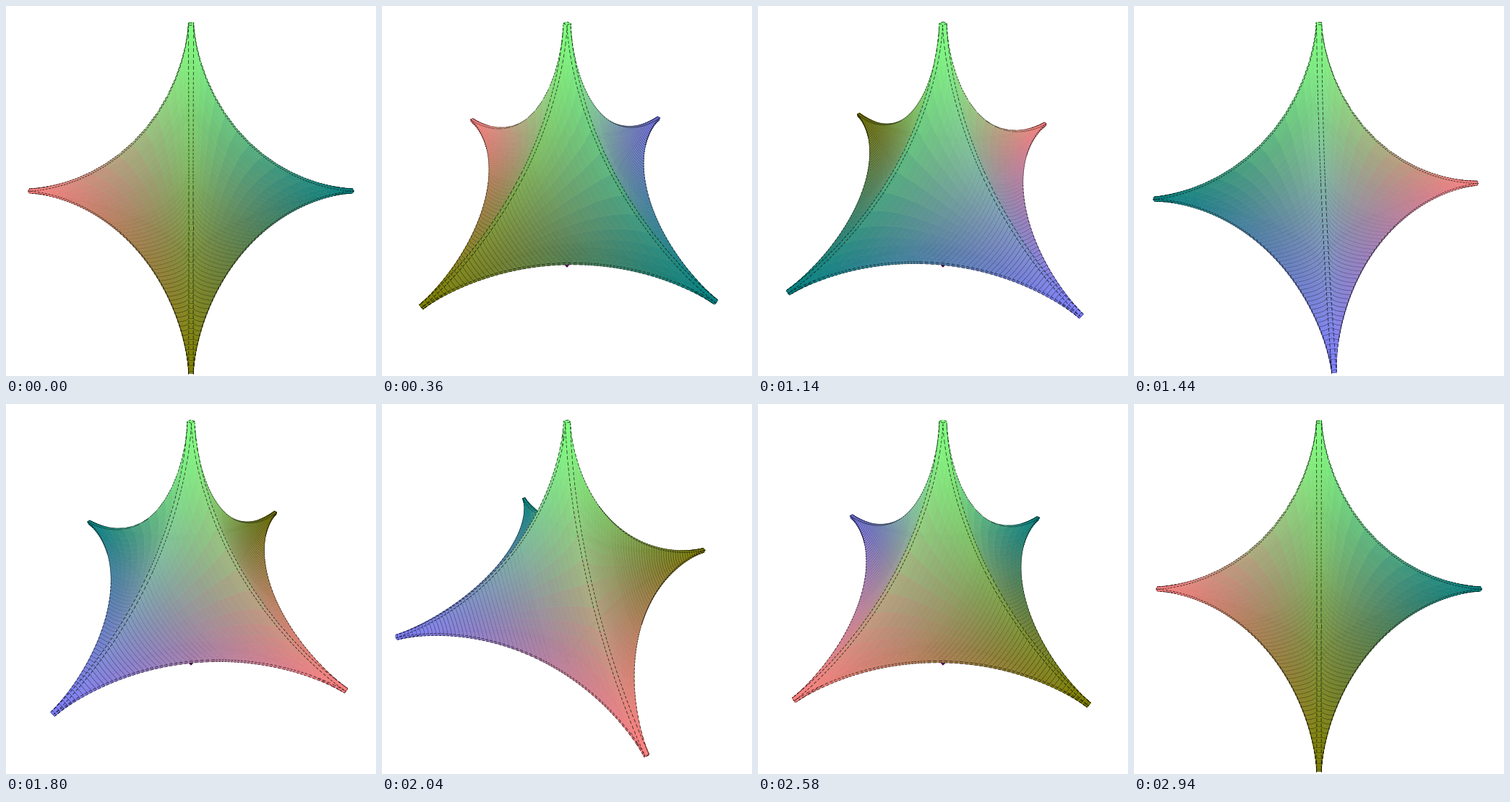
A matplotlib script that plays this animation: 512x512 px, repeating every 3000 ms.

```python
import numpy as np
import matplotlib.pyplot as plt
from matplotlib.animation import FuncAnimation
from matplotlib.collections import PolyCollection

SIZE, DPI = 512, 100
FRAMES, INTERVAL = 50, 60
PX = 72 / DPI

# Camera: distance, focal length in pixels, elevation
DIST, FOCAL, ELEV = 2.002, 448, np.radians(50.4)
SIN_E, COS_E = np.sin(ELEV), np.cos(ELEV)

# Star surface |x|^(2/n) + |y|^(2/n) + |z|^(2/n) = 1 with flat ridges of half width RIM
POWER, RIM, STEPS = 3.1, 0.01, 20
INK = 0.04


def build_grid():
    half = np.r_[0, 0.0005, 0.002, 0.005, 0.01, np.arange(1, 50) / 49.5, 1]
    level = np.r_[-half[::-1], half]
    side = np.r_[-np.ones(len(half)), np.ones(len(half))]
    radius = (1 - np.abs(level) ** (2 / POWER)) ** (POWER / 2)

    t = np.linspace(0, np.pi / 2, STEPS)
    c, s = np.cos(t).clip(0) ** POWER, np.sin(t).clip(0) ** POWER
    one = np.ones(STEPS)
    ring_x, ring_z = np.r_[c, -s, -c, s], np.r_[s, c, -s, -c]
    sign_x, sign_z = np.r_[one, -one, -one, one], np.r_[one, one, -one, -one]

    x = RIM * sign_x + (1 - RIM) * radius[:, None] * ring_x
    z = RIM * sign_z + (1 - RIM) * radius[:, None] * ring_z
    y = (RIM * side + (1 - RIM) * level)[:, None] + 0 * x
    return np.stack([x, y, z], axis=-1)


grid = build_grid()
rows, cols = grid.shape[:2]
after = np.roll(grid, -1, axis=1)
quads = np.stack([grid[:-1], grid[1:], after[1:], after[:-1]], axis=2)
quads = quads.reshape(-1, 4, 3)

corners = np.arange(4) * STEPS
caps = np.array([grid[0, corners[::-1]], grid[-1, corners]])
if np.cross(caps[0, 1] - caps[0, 0], caps[0, 2] - caps[0, 0])[1] * \
        np.cross(quads[0, 1] - quads[0, 0], quads[0, 3] - quads[0, 0])[1] < 0:
    caps = caps[:, ::-1]
quads = np.concatenate([quads, caps])
face_rgb = np.clip(0.5 + 0.5 * quads.mean(axis=1)[:, [0, 2, 1]], 0, 1)

segments, owners, alphas, widths = [], [], [], []


def add_line(p, q, faces, alpha, width, dashed):
    parts = max(1, round(np.linalg.norm(q - p) / 0.02)) if dashed else 1
    fill = 0.62 if dashed else 1
    for k in range(parts):
        a, b = k / parts, (k + fill) / parts
        segments.append((p + a * (q - p), p + b * (q - p)))
        owners.append(faces)
        alphas.append(alpha)
        widths.append(width)


def face_id(i, j):
    return min(max(i, 0), rows - 2) * cols + j % cols


# Rings: fine slices across y, dashed where they border the equatorial rim
for i in range(rows):
    depth = abs(grid[i, 0, 1])
    rim = i in (rows // 2 - 1, rows // 2)
    if not rim and depth < 0.24:
        continue
    alpha = 0.75 if rim else 0.08 + 0.5 * min(1, (depth - 0.24) / 0.5)
    for j in range(cols):
        add_line(grid[i, j], after[i, j], (face_id(i - 1, j), face_id(i, j)),
                 alpha, 0.9 if rim else 0.6, rim)

# Ridges running from tip to tip
for j in range(cols):
    if j % STEPS in (0, STEPS - 1):
        for i in range(rows - 1):
            add_line(grid[i, j], grid[i + 1, j], (face_id(i, j - 1), face_id(i, j)),
                     0.75, 0.9, True)

segments, owners = np.array(segments), np.array(owners)
line_rgba = np.c_[np.full((len(alphas), 3), INK), alphas]
line_width = np.array(widths) * PX


def project(p, angle):
    c, s = np.cos(angle), np.sin(angle)
    right = -p[..., 0] * c + p[..., 1] * s
    front = -p[..., 0] * s - p[..., 1] * c
    up = p[..., 2]
    depth = DIST - front * COS_E - up * SIN_E
    xy = np.stack([right, up * COS_E - front * SIN_E], axis=-1)
    return FOCAL * xy / depth[..., None], depth


fig = plt.figure(figsize=(SIZE / DPI, SIZE / DPI), dpi=DPI, facecolor="white")
ax = fig.add_axes([0, 0, 1, 1])
ax.set(xlim=(-SIZE / 2, SIZE / 2), ylim=(-SIZE / 2, SIZE / 2))
ax.axis("off")
mesh = PolyCollection([], closed=True)
ax.add_collection(mesh, autolim=False)


def draw(frame):
    angle = 2 * np.pi * frame / (FRAMES - 1)
    xy, depth = project(quads, angle)
    d1, d2 = xy[:, 2] - xy[:, 0], xy[:, 3] - xy[:, 1]
    facing = d1[:, 0] * d2[:, 1] - d1[:, 1] * d2[:, 0] < 0

    shown = facing[owners].any(axis=1)
    line_xy, line_depth = project(segments[shown], angle)
    rgba = np.c_[face_rgb[facing], np.ones(facing.sum())]
    ink = line_rgba[shown]
    clear = np.zeros_like(ink)

    # Painter's order, lines pulled slightly toward the camera
    order = np.argsort(-np.r_[depth[facing].mean(axis=1),
                              line_depth.mean(axis=1) - 0.035])
    shapes = np.concatenate([xy[facing], line_xy[:, [0, 1, 1, 0]]])
    mesh.set_verts(shapes[order])
    mesh.set_facecolor(np.concatenate([rgba, clear])[order])
    mesh.set_edgecolor(np.concatenate([rgba, ink])[order])
    mesh.set_linewidth(np.r_[np.full(len(rgba), 0.5 * PX), line_width[shown]][order])
    return mesh,


anim = FuncAnimation(fig, draw, frames=FRAMES, interval=INTERVAL,
                     init_func=lambda: draw(0), repeat=True, repeat_delay=0)
plt.show()
```
